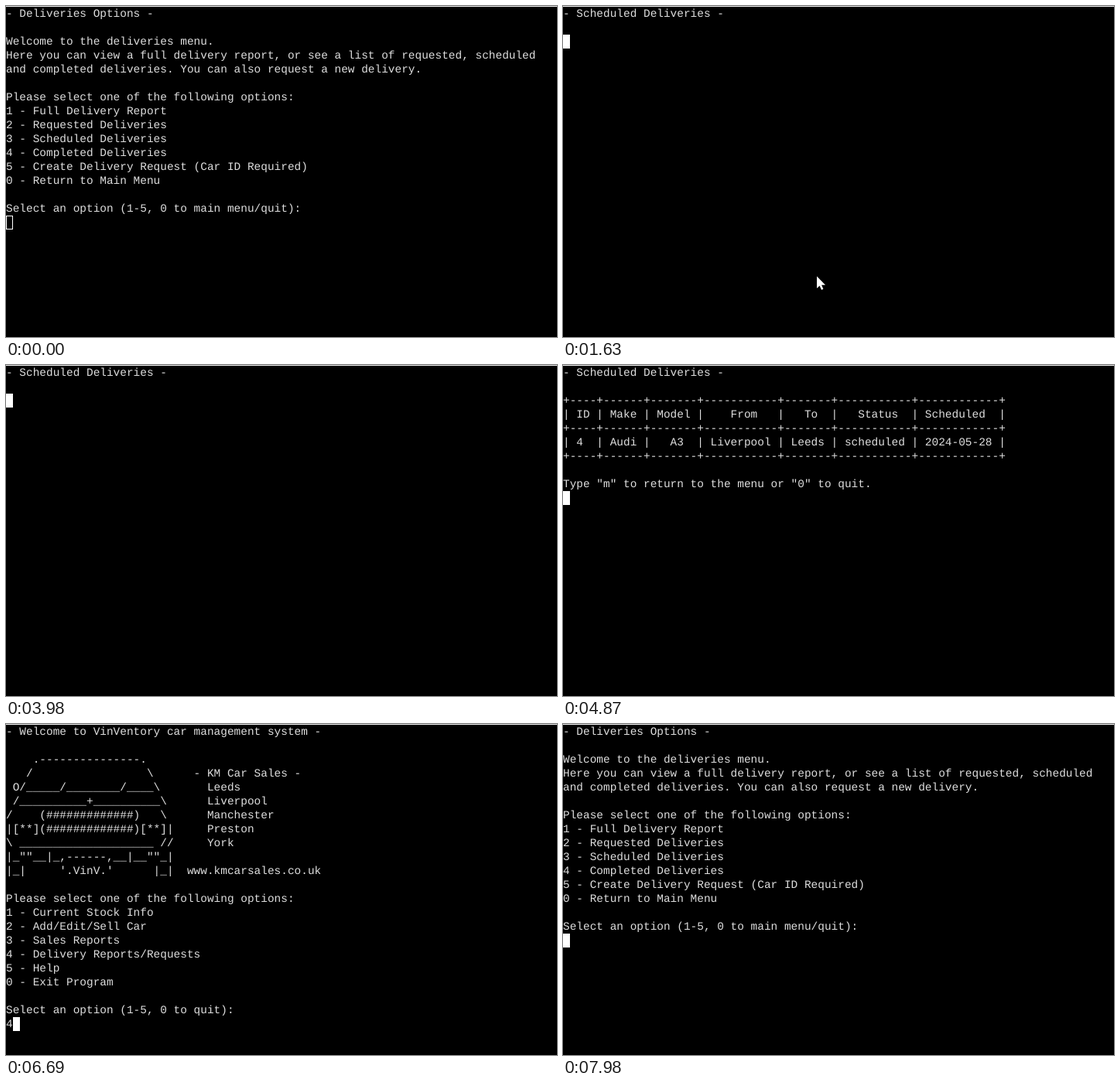
These frames come from a looping animation (712x428 px, 8 s). An HTML page:

```html
<!DOCTYPE html>
<html lang="en">
<head>
<meta charset="utf-8">
<title>Terminal</title>
<style>
html, body { margin: 0; width: 100%; height: 100%; overflow: hidden; background: #000; }
svg { display: block; }
text {
  font: 14.444px "Liberation Mono", monospace;
  fill: #dedede;
  white-space: pre;
  text-rendering: geometricPrecision;
}
</style>
</head>
<body>
<svg id="stage" width="712" height="428" viewBox="0 0 712 428">
  <rect width="712" height="428" fill="#000"/>
  <rect width="712" height="1" fill="#f2f2f2"/>
  <g id="lines"></g>
  <rect id="caret" stroke="#fff"/>
  <path id="pointer" d="M0 0V15.5L3.6 12.2L6 17.6L8.4 16.6L6.1 11.3H11Z" fill="#fff"/>
</svg>
<script>
const LOOP = 8000, COL = 8.6667, ROW = 18, TOP = 1, BASE = 13;
const $ = id => document.getElementById(id);

const options = `- Deliveries Options -

Welcome to the deliveries menu.
Here you can view a full delivery report, or see a list of requested, scheduled
and completed deliveries. You can also request a new delivery.

Please select one of the following options:
1 - Full Delivery Report
2 - Requested Deliveries
3 - Scheduled Deliveries
4 - Completed Deliveries
5 - Create Delivery Request (Car ID Required)
0 - Return to Main Menu

Select an option (1-5, 0 to main menu/quit):
`;

const header = `- Scheduled Deliveries -

`;

const rule = '+' + [4, 6, 7, 11, 7, 11, 12].map(n => '-'.repeat(n) + '+').join('');
const table = header + `${rule}
| ID | Make | Model |    From   |   To  |   Status  | Scheduled  |
${rule}
| 4  | Audi |   A3  | Liverpool | Leeds | scheduled | 2024-05-28 |
${rule}

Type "m" to return to the menu or "0" to quit.
`;

const home = String.raw`- Welcome to VinVentory car management system -

    .---------------.
   /                 \      - KM Car Sales -
 O/_____/________/____\       Leeds
 /__________+__________\      Liverpool
/    (#############)   \      Manchester
|[**](#############)[**]|     Preston
\ ____________________ //     York
|_""__|_,------,__|__""_|
|_|     '.VinV.'      |_|  www.kmcarsales.co.uk

Please select one of the following options:
1 - Current Stock Info
2 - Add/Edit/Sell Car
3 - Sales Reports
4 - Delivery Reports/Requests
5 - Help
0 - Exit Program

Select an option (1-5, 0 to quit):
`;

// Start time and full screen text; the caret sits at the end of the text
const screens = [
  [0, options],
  [1120, options + '3'],
  [1490, header],
  [4070, table],
  [5180, table + 'm'],
  [5280, table + 'm\n'],
  [5380, home],
  [6580, home + '4'],
  [6870, home + '4\n'],
  [6980, options]
];

const FOCUS = 470, ENTER = 110, REST = 320, HIDE = 2580;

const rows = Array.from({ length: 24 }, (_, i) => {
  const el = document.createElementNS('http://www.w3.org/2000/svg', 'text');
  el.setAttribute('y', TOP + i * ROW + BASE);
  $('lines').append(el);
  return el;
});

function set(el, attrs) {
  for (const k in attrs) el.setAttribute(k, attrs[k]);
}

let shown = null;
function print(text) {
  if (text === shown) return;
  shown = text;
  const lines = text.split('\n');
  rows.forEach((el, i) => { el.textContent = lines[i] || ''; });
}

function drawCaret(text, focused) {
  const lines = text.split('\n');
  const x = Math.round(lines[lines.length - 1].length * COL);
  const y = TOP + (lines.length - 1) * ROW;
  set($('caret'), focused
    ? { x, y, width: 9, height: 18, fill: '#fff', 'stroke-width': 0 }
    : { x: x + 0.5, y: y + 0.5, width: 8, height: 17, fill: 'none', 'stroke-width': 1 });
}

function drawPointer(t) {
  const p = Math.min(1, Math.max(0, (t - ENTER) / (REST - ENTER)));
  const left = (1 - p) ** 2;
  set($('pointer'), {
    transform: `translate(${328 + 22 * left} ${349.5 + 68 * left})`,
    visibility: t >= ENTER && t < HIDE ? 'visible' : 'hidden'
  });
}

function draw(t) {
  const text = screens.filter(s => s[0] <= t).pop()[1];
  print(text);
  drawCaret(text, t >= FOCUS);
  drawPointer(t);
}

const start = performance.now();
function tick() {
  draw((performance.now() - start) % LOOP);
  requestAnimationFrame(tick);
}
tick();
</script>
</body>
</html>
```
